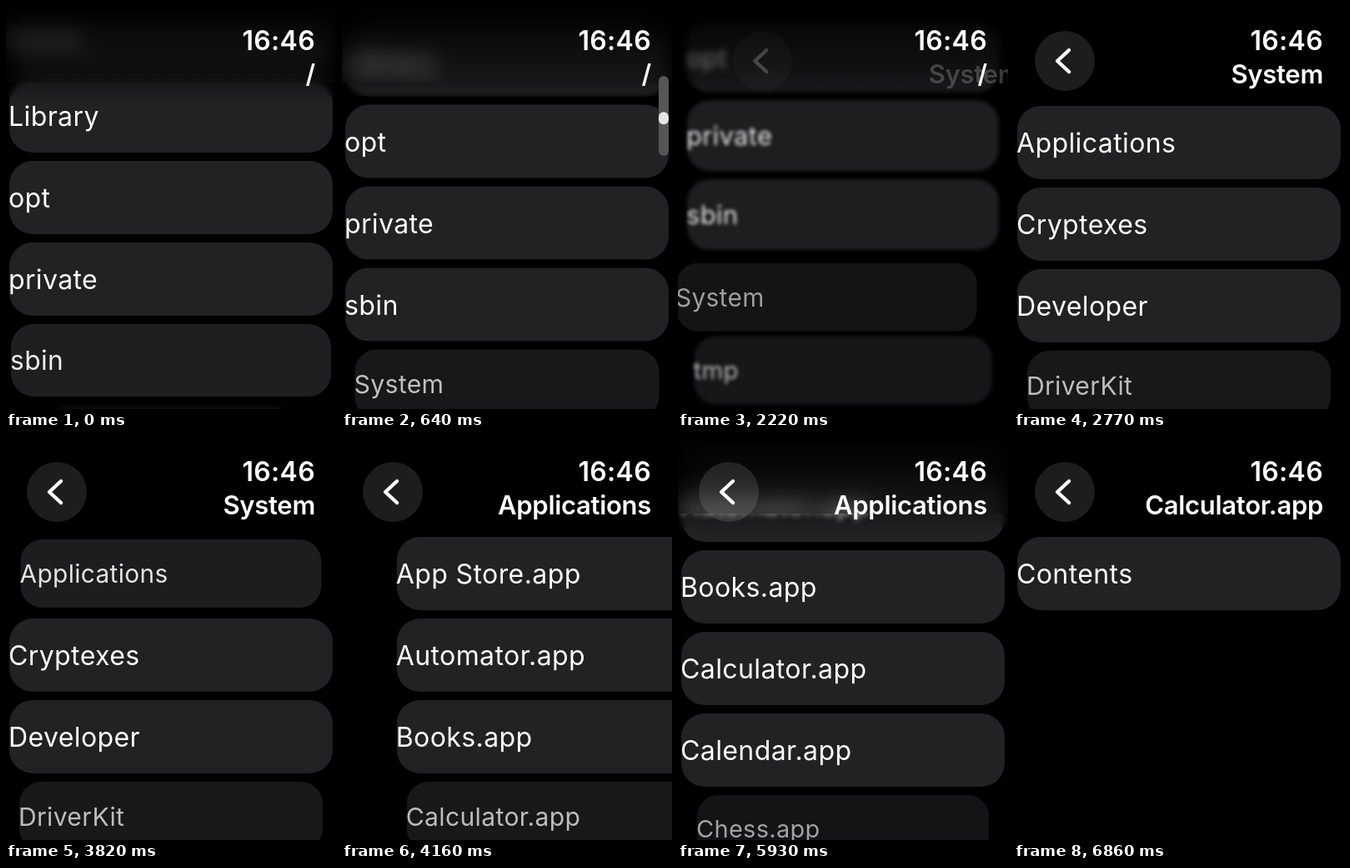
An HTML page with a canvas that plays this animation: 396x484 px, repeating every 7550 ms.

```html
<!DOCTYPE html>
<html lang="en">
<head>
<meta charset="utf-8">
<title>File browser on a watch</title>
<style>
  html, body { margin: 0; width: 100%; height: 100%; overflow: hidden; background: #000; }
  canvas { display: block; }
</style>
</head>
<body>
<canvas id="stage" width="396" height="484"></canvas>
<script>
const W = 396, H = 484, LOOP = 7550;
const ROW = { top: 120, width: 388, height: 88, pitch: 98, radius: 28 };

const ctx = document.getElementById('stage').getContext('2d');
const layer = document.createElement('canvas');
layer.width = W;
layer.height = H;
const list = layer.getContext('2d');

const pages = [
  { title: '/', range: 1285, scroll: [620, 793, 200, 990],
    rows: ['Applications', 'bin', 'cores', 'dev', 'etc', 'home', 'Library', 'opt',
           'private', 'sbin', 'System', 'tmp', 'Users', 'usr', 'var'],
    tap: 'System', press: 1650, push: 2105 },
  { title: 'System',
    rows: ['Applications', 'Cryptexes', 'Developer', 'DriverKit'],
    tap: 'Applications', press: 3560, push: 3814 },
  { title: 'Applications', range: 4700, scroll: [0, 180, 4600, 5030],
    rows: ['App Store.app', 'Automator.app', 'Books.app', 'Calculator.app',
           'Calendar.app', 'Chess.app', 'Clock.app'],
    tap: 'Calculator.app', press: 5980, push: 6195 },
  { title: 'Calculator.app', rows: ['Contents'] }
];

// The screen refreshes in bursts: [first change, last change, number of changes]
const bursts = [
  [310, 990, 7], [1270, 1480, 3], [1650, 1760, 2], [2110, 2770, 7], [3630, 3630, 1],
  [3820, 4500, 7], [4710, 5030, 4], [5350, 5560, 3], [5930, 6050, 2], [6200, 6860, 7]
];

const clamp = v => Math.min(1, Math.max(0, v));
const smooth = v => { v = clamp(v); return v * v * (3 - 2 * v); };

function lastRefresh(t) {
  let shown = 0;
  for (const [from, to, count] of bursts) {
    if (t < from) break;
    const gap = count > 1 ? (to - from) / (count - 1) : 1;
    shown = from + gap * Math.min(count - 1, Math.floor((t - from) / gap + 0.01));
  }
  return shown;
}

function scrollOf(page, t) {
  if (!page.scroll) return 0;
  const [from, to, start, end] = page.scroll;
  return from + (to - from) * smooth((t - start) / (end - start));
}

// Critically damped slide of the incoming page
function slideOffset(elapsed) {
  const x = 0.014 * Math.max(0, elapsed - 110);
  return Math.max(0, 400 * (1 + x) * Math.exp(-x) - 1.5);
}

function drawRow(label, cx, top, scale, alpha) {
  list.save();
  list.globalAlpha = alpha;
  list.translate(cx, top);
  list.scale(scale, scale);
  list.beginPath();
  list.roundRect(-ROW.width / 2, 0, ROW.width, ROW.height, ROW.radius);
  list.fillStyle = '#222224';
  list.fill();
  list.font = '400 32px Inter, sans-serif';
  list.letterSpacing = '0.4px';
  list.fillStyle = '#fff';
  list.fillText(label, -ROW.width / 2 - 1, 56);
  list.restore();
}

function drawPage(page, t, dx, leave) {
  const scroll = scrollOf(page, t);
  const shrink = 1 - 0.11 * leave;
  const press = clamp((t - page.press) / 70 || 0);
  page.rows.forEach((label, i) => {
    const top = ROW.top + i * ROW.pitch - scroll;
    if (top > H || top < -ROW.height) return;
    // Rows shrink and fade as they reach the bottom edge
    const low = Math.max(0, top - 372);
    const scale = 1 - 0.0009 * low - 0.0000135 * low * low;
    const alpha = Math.max(0.12, 1 - 0.0067 * low);
    if (label === page.tap && press) {
      const s = scale * (1 - 0.07 * press);
      drawRow(label, W / 2 + dx - 60 * leave,
              top + (ROW.height * (scale - s)) / 2 - 4 * leave,
              s, alpha * (1 - leave) * (1 - 0.12 * press));
      return;
    }
    list.filter = leave ? `blur(${7 * leave}px)` : 'none';
    drawRow(label, W / 2 + dx, 180 + (top - 180) * shrink, scale * shrink,
            alpha * (1 - leave * leave));
    list.filter = 'none';
  });
}

// Content blurs and darkens as it passes under the header
function composeList(strength) {
  for (const [from, to, blur] of [[0, 92, 12], [92, 108, 3], [108, H, 0]]) {
    ctx.save();
    ctx.beginPath();
    ctx.rect(0, from, W, to - from);
    ctx.clip();
    if (blur) ctx.filter = `blur(${blur * strength}px)`;
    ctx.drawImage(layer, 0, 0);
    ctx.restore();
  }
  const shade = ctx.createLinearGradient(0, 0, 0, 116);
  [[0, 1], [0.25, 0.73], [0.65, 0.43], [0.88, 0.18], [1, 0]].forEach(([stop, a]) =>
    shade.addColorStop(stop, `rgba(0,0,0,${a})`));
  ctx.fillStyle = shade;
  ctx.fillRect(0, 0, W, 116);
}

function headerText(text, y, size, spacing, dx = 0, alpha = 1) {
  ctx.font = `600 ${size}px Inter, sans-serif`;
  ctx.letterSpacing = spacing + 'px';
  ctx.textAlign = 'right';
  ctx.globalAlpha = alpha;
  ctx.fillStyle = '#fff';
  ctx.fillText(text, 371 + dx, y);
  ctx.globalAlpha = 1;
}

function backButton(dx, alpha) {
  ctx.save();
  ctx.globalAlpha = alpha;
  ctx.translate(61 + dx, 66);
  ctx.fillStyle = 'rgba(255,255,255,.115)';
  ctx.beginPath();
  ctx.arc(0, 0, 36, 0, 7);
  ctx.fill();
  ctx.strokeStyle = '#fff';
  ctx.lineWidth = 4.4;
  ctx.lineCap = ctx.lineJoin = 'round';
  ctx.beginPath();
  ctx.moveTo(5, -13);
  ctx.lineTo(-9, 0);
  ctx.lineTo(5, 13);
  ctx.stroke();
  ctx.restore();
}

function pill(x, y, w, h, color) {
  ctx.fillStyle = color;
  ctx.beginPath();
  ctx.roundRect(x, y, w, h, w / 2);
  ctx.fill();
}

function scrollBar(page, t) {
  if (!page.scroll) return;
  const [, , start, end] = page.scroll;
  const alpha = clamp((t - start) / 100) * clamp(1 - (t - end - 200) / 290);
  if (!alpha) return;
  ctx.globalAlpha = alpha;
  pill(380, 84, 12, 96, '#555556');
  pill(380, 84 + 81 * clamp(scrollOf(page, t) / page.range), 12, 15, '#e6e6e6');
  ctx.globalAlpha = 1;
}

function draw(t) {
  const next = pages.filter(p => p.push <= t).length;
  const page = pages[next], old = pages[next - 1];
  const elapsed = old ? t - old.push : Infinity;
  const enter = smooth(elapsed / 300);
  const leaving = old && enter < 1;

  list.clearRect(0, 0, W, H);
  if (leaving) drawPage(old, t, 0, enter);
  drawPage(page, t, old ? slideOffset(elapsed) : 0, 0);

  ctx.fillStyle = '#000';
  ctx.fillRect(0, 0, W, H);
  composeList(leaving ? (1 - enter) ** 3 : 1);
  scrollBar(page, t);

  const dx = 60 * (1 - enter), fade = enter ** 1.4;
  if (next === 1) backButton(dx, fade);
  if (next > 1) backButton(0, 1);
  headerText('16:46', 53, 32, 0.3);
  if (leaving) headerText(old.title, 93, 31, -0.3, 0, clamp(2 - 3 * enter));
  headerText(page.title, 93, 31, -0.3, dx, fade);
}

function tick() {
  draw(lastRefresh(performance.now() % LOOP));
  requestAnimationFrame(tick);
}
tick();
</script>
</body>
</html>
```
